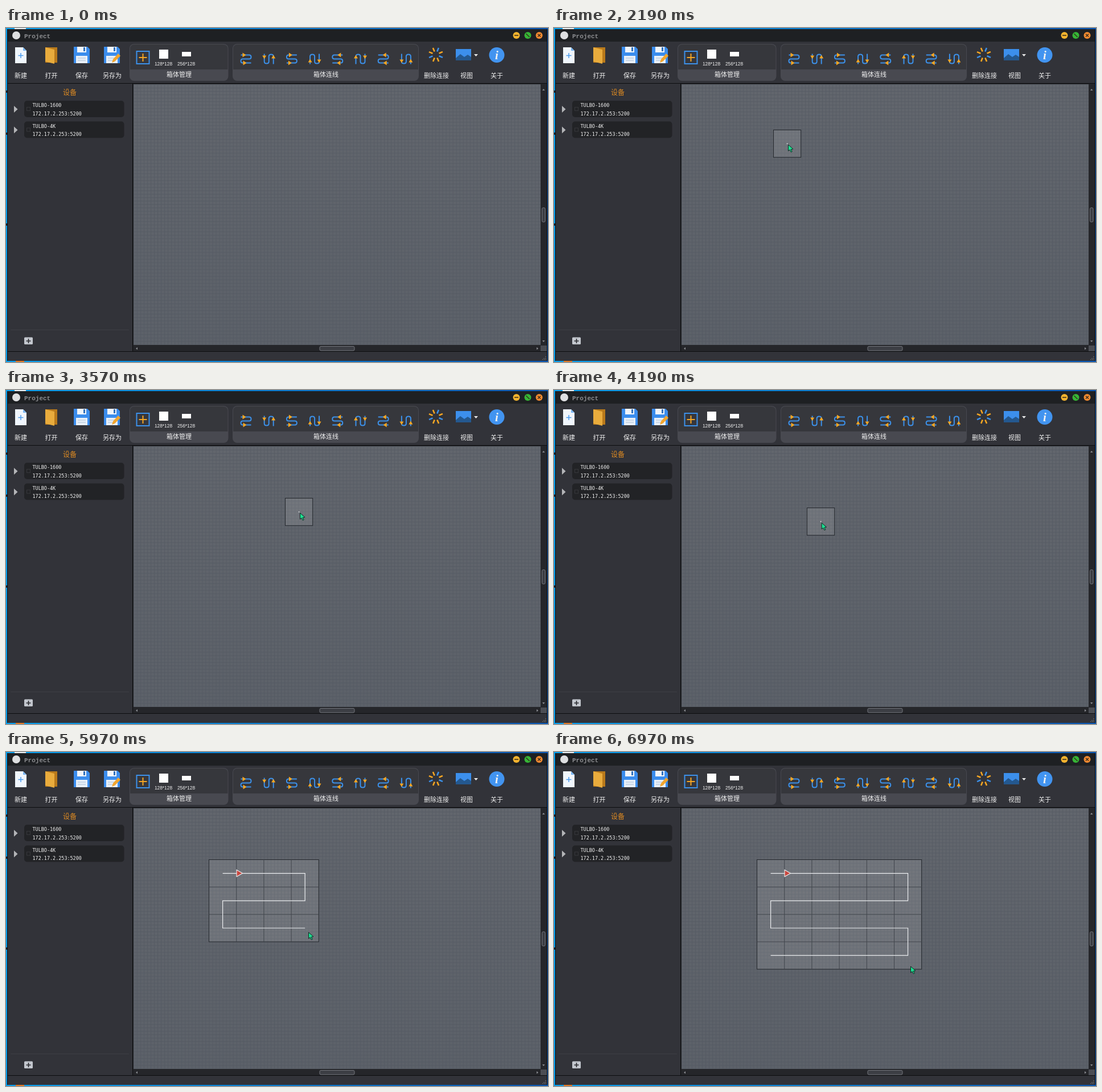
Write an HTML page that moves like this. It is 952 by 588 pixels and loops after 8 s.

```html
<!DOCTYPE html>
<html lang="zh">
<head>
<meta charset="utf-8">
<title>Project</title>
<style>
  html, body { margin: 0; width: 100%; height: 100%; overflow: hidden; background: #34353b; }
  svg { display: block; width: 100vw; height: 100vh; }
  text { fill: #f2f2f2; font: 11px "Noto Sans CJK SC", "Noto Sans CJK", sans-serif; }
  .label { text-anchor: middle; }
  .size { font: 8.4px "Liberation Sans", sans-serif; text-anchor: middle; }
  .mono { font: 8.45px "DejaVu Sans Mono", monospace; }
  .title { font: bold 11px "Liberation Mono", monospace; fill: #8c8d90; }
  .line { fill: none; stroke: #3c91ea; stroke-width: 2; }
</style>
</head>
<body>
<svg viewBox="0 0 952 588">
  <defs>
    <linearGradient id="desktop">
      <stop stop-color="#08a0ee"/><stop offset="1" stop-color="#0a55b0"/>
    </linearGradient>
    <linearGradient id="surface" x2="0" y2="1">
      <stop stop-color="#62666d"/><stop offset="1" stop-color="#5c6169"/>
    </linearGradient>
    <pattern id="mesh" x="356.5" y="189.5" width="6.03" height="6.03" patternUnits="userSpaceOnUse">
      <path d="M0 .5H6.03M.5 0V6.03" stroke="#4d535d" stroke-opacity=".5"/>
    </pattern>
    <clipPath id="view"><rect x="224" y="99" width="715" height="459"/></clipPath>
    <g id="disk">
      <path d="M-14-14H10L14-10V15H-14Z" fill="#3b8ded"/>
      <path d="M-8-14H8V-4H-8Z" fill="#f1f5fa"/>
      <path d="M3-13H6V-6H3Z" fill="#3272bd"/>
      <path d="M-10 2H10V15H-10Z" fill="#e9f0f8"/>
      <path d="M-7 6H7M-7 10H7" stroke="#a9bed4"/>
    </g>
    <g id="rowWise">
      <path class="line" d="M-9-7H5.5Q9-7 9-3.5T5.5 0H-5.5Q-9 0-9 3.5T-5.5 7H9"/>
      <path d="M-6-11L0-7L-6-3ZM-5 3L1 7L-5 11Z" fill="#f5a623"/>
    </g>
    <g id="columnWise">
      <path class="line" d="M-8-9V4.5Q-8 8-4 8T0 4.5V-4.5Q0-8 4-8T8-4.5V9"/>
      <path d="M-11.500-6H-4.500L-8 0ZM4.500-1H11.500L8-7Z" fill="#f5a623"/>
    </g>
    <g id="device">
      <path d="M14 9L20.500 15L14 21Z" fill="#b4b5b8"/>
      <rect x="32" width="175.500" height="29" rx="5" fill="#222326"/>
      <rect x="36.500" y="11.500" width="6" height="6" fill="none" stroke="#36373b"/>
    </g>
  </defs>

  <!-- window frame -->
  <rect width="952" height="588" fill="url(#desktop)"/>
  <path d="M15 0H35V2H15Z" fill="#e8eef2"/>
  <path d="M0 110H2V114H0ZM0 184H2V188H0ZM0 344H2V348H0Z" fill="#123"/>
  <rect x="2" y="2" width="949" height="584" fill="#323339"/>
  <rect x="2" y="2" width="949" height="22" fill="#1e2023"/>
  <path d="M17 586H32V588H17Z" fill="#e07a28"/>
  <path d="M2.500 2V586M2 97.500H951M222.500 97V570M2 569.500H951M950.500 2V586" stroke="#0c0d0f" fill="none"/>
  <circle cx="18" cy="13" r="7" fill="#dedfe1"/>
  <text class="title" x="32" y="17.500">Project</text>
  <circle cx="896.500" cy="13" r="6" fill="#f2b32e"/>
  <circle cx="916.500" cy="13" r="6" fill="#36b536"/>
  <circle cx="936.500" cy="13" r="6" fill="#f28a30"/>
  <path d="M893 13H900M913.500 10L919.500 16M934 10.500L939 15.500M939 10.500L934 15.500" stroke="#33281c" stroke-width="1.300"/>

  <!-- toolbar -->
  <path d="M16 34H30L36 40V62H16Z" fill="#f0f6fd"/>
  <path d="M30 34V40H36Z" fill="#79b5f2"/>
  <path d="M26 44V53M21.500 48.500H30.500" stroke="#4a9bee" stroke-width="1.500"/>
  <path d="M69 34H90V61H69Z" fill="#b97a1b"/>
  <path d="M69 34L85 38V63L69 59Z" fill="#e9ac3d"/>
  <use href="#disk" x="133" y="47"/>
  <use href="#disk" x="186" y="47"/>
  <path d="M186 61L188 55L197 45L201 49L191 59Z" fill="#f2a52d"/>
  <g fill="#484950">
    <rect x="217" y="28" width="173.500" height="65" rx="8"/>
    <rect x="398" y="28" width="327" height="65" rx="8"/>
  </g>
  <path d="M218 73V37Q218 29 226 29H381Q389.500 29 389.500 37V73ZM399 73V37Q399 29 407 29H716Q724 29 724 37V73Z" fill="#36373c"/>
  <rect class="line" x="229.500" y="41" width="22" height="22"/>
  <path d="M240.500 45V59M233.500 52H247.500" stroke="#f5a623" stroke-width="2"/>
  <path d="M269 38H285V54H269ZM309 42H325V50H309Z" fill="#fff"/>
  <text class="size" x="276.500" y="66">128*128</text>
  <text class="size" x="316.500" y="66">256*128</text>
  <g id="routes"></g>
  <g id="burst" transform="translate(755 47)" stroke-width="2.600"></g>
  <path d="M790 37H817V57H790Z" fill="#3c8fec"/>
  <path d="M790 53L798 46L805 51L811 47L817 51V57H790Z" fill="#24588f"/>
  <path d="M822 46H829L825.500 50Z" fill="#e8e8e8"/>
  <circle cx="862" cy="47.500" r="13.500" fill="#4294f0"/>
  <text x="862" y="54.500" class="label" style="font: italic bold 21px 'Liberation Serif', serif">i</text>
  <g id="labels"></g>

  <!-- device panel -->
  <text class="label" x="112" y="118" style="fill:#e08c22;font-size:12px">设备</text>
  <use href="#device" y="128"/>
  <use href="#device" y="164.500"/>
  <text class="mono" x="46.500" y="139">TULBO-1600</text>
  <text class="mono" x="46.500" y="153.500">172.17.2.253:5200</text>
  <text class="mono" x="46.500" y="175.500">TULBO-4K</text>
  <text class="mono" x="46.500" y="190">172.17.2.253:5200</text>
  <path d="M8 531.500H216" stroke="#3d3e44"/>
  <rect x="32" y="544.500" width="15" height="12.500" rx="1.500" fill="#c3c7ce"/>
  <path d="M39.500 547V555M35.500 551H43.500" stroke="#26272b" stroke-width="1.600"/>

  <!-- work area and scrollbars -->
  <path d="M223 98H950V569H223Z" fill="#25262a"/>
  <g clip-path="url(#view)">
    <path d="M224 99H939V558H224Z" fill="url(#surface)"/>
    <path d="M224 99H939V558H224Z" fill="url(#mesh)"/>
    <g id="cabinets">
      <rect id="area" fill="#fff" fill-opacity=".11" stroke="#25282d"/>
      <path id="dividers" fill="none" stroke="#43474e"/>
      <path id="wire" fill="none" stroke="#eef0f2" stroke-width="1.200"/>
      <path id="arrow" d="M405 207.500L415.500 213.500L405 219.500Z" fill="#c8473f" stroke="#eceded" stroke-width="1.200"/>
      <rect id="dot" width="1.500" height="1.500" fill="#f4f5f6"/>
    </g>
  </g>
  <g fill="#3c3e44" stroke="#74767c">
    <rect x="941.500" y="316.500" width="5.500" height="25" rx="2"/>
    <rect x="551" y="560.500" width="61" height="7.500" rx="2"/>
  </g>
  <path d="M942 110H946.500L944.200 107ZM942 550H946.500L944.200 553ZM231 562V566.500L228 564.200ZM932 562V566.500L935 564.200Z" fill="#8a8c91"/>
  <path d="M939 559H950V569H939Z" fill="#4c4e54"/>
  <path d="M948 578V584M945 581V584M942 583.500H949" stroke="#777a80" stroke-width="1.200" stroke-dasharray="1.500"/>

  <path id="cursor" d="M.5 .5V11.500L3.200 9.300L5.300 13.500L7.200 12.600L5.300 8.600L9 8Z" fill="#1fdd91" stroke="#0b2a20"/>
</svg>
<script>
const $ = id => document.getElementById(id);
const set = (id, attrs) => Object.entries(attrs).forEach(([k, v]) => $(id).setAttribute(k, v));

$('labels').innerHTML = [
  ['新建', 26, 88], ['打开', 79.5, 88], ['保存', 133, 88], ['另存为', 186.5, 88],
  ['箱体管理', 304, 86], ['箱体连线', 562, 86], ['删除连接', 756, 88], ['视图', 809, 88], ['关于', 862, 88]
].map(([s, x, y]) => `<text class="label" x="${x}" y="${y}">${s}</text>`).join('');

$('routes').innerHTML = Array.from({ length: 8 }, (_, i) => {
  const flipX = i < 4 ? 1 : -1, flipY = i % 4 < 2 ? 1 : -1;
  return `<use href="#${i % 2 ? 'columnWise' : 'rowWise'}" transform="translate(${421.5 + i * 40.2} 54.5) scale(${flipX} ${flipY})"/>`;
}).join('');

$('burst').innerHTML = Array.from({ length: 8 }, (_, i) =>
  `<path d="M6 0H13" stroke="${i % 3 ? '#f5a623' : '#3c91ea'}" transform="rotate(${i * 45 + 22})"/>`).join('');

// Cursor moves: start ms, ms per step, steps, destination x, y
const MOVES = [
  [160, 78, 11, 341, 69],
  [1010, 80, 3, 286, 51.5], [1250, 75, 3, 284, 51],
  [1720, 76.6, 4, 411, 199],
  [2100, 90, 2, 411, 205], [2250, 80, 2, 412, 211],
  [2560, 90, 2, 412, 213],
  [2790, 78, 6, 460, 221], [3258, 78, 5, 516, 216],
  [3660, 60, 2, 528, 219],
  [3900, 75.5, 5, 455, 237], [4277.5, 75.5, 5, 381, 214],
  [4900, 75, 3, 405, 231], [5130, 76, 8, 498, 293],
  [5740, 76.6, 4, 531, 317], [6050, 76.6, 7, 600, 356],
  [6590, 76, 6, 626, 377]
];
const LOOP = 8000, DRAG = 1720, DROP = 4579, CELL = 48.2, LEFT = 356.5, TOP = 189.5;

function cursorAt(t) {
  let x = 887, y = 609;
  for (const [start, step, count, toX, toY] of MOVES) {
    if (t < start) break;
    const p = Math.min(1, (Math.floor((t - start) / step) + 1) / count);
    x += (toX - x) * p;
    y += (toY - y) * p;
  }
  return [x, y];
}

function drawCabinets(left, top, cols, rows) {
  const px = c => left + c * CELL, py = r => top + r * CELL;
  set('area', { x: left, y: top, width: cols * CELL, height: rows * CELL });
  let dividers = '', wire = '';
  for (let c = 1; c < cols; c++) dividers += `M${px(c)} ${top}V${py(rows)}`;
  for (let r = 1; r < rows; r++) dividers += `M${left} ${py(r)}H${px(cols)}`;
  for (let r = 0; r < rows; r++) {
    const ends = [px(.5), px(cols - .5)];
    if (r % 2) ends.reverse();
    wire += `${r ? 'L' : 'M'}${ends[0]} ${py(r + .5)}H${ends[1]}`;
  }
  const single = cols * rows === 1;
  set('dividers', { d: dividers });
  set('wire', { d: single ? '' : wire });
  set('arrow', { visibility: cols > 1 ? 'inherit' : 'hidden' });
  set('dot', { x: px(.5) - .75, y: py(.5) - .75, visibility: single ? 'inherit' : 'hidden' });
}

function render(t) {
  const [x, y] = cursorAt(t);
  set('cursor', { transform: `translate(${x} ${y})` });
  set('cabinets', { visibility: t >= DRAG && y > 98 ? 'visible' : 'hidden' });
  const cells = d => Math.max(1, Math.round(d / CELL));
  if (t < DROP) drawCabinets(Math.round(x) - 25.5, Math.round(y) - 25.5, 1, 1);
  else drawCabinets(LEFT, TOP, cells(x - LEFT), cells(y - TOP));
}

const began = performance.now();
function tick() {
  render((performance.now() - began) % LOOP);
  requestAnimationFrame(tick);
}
tick();
</script>
</body>
</html>
```
